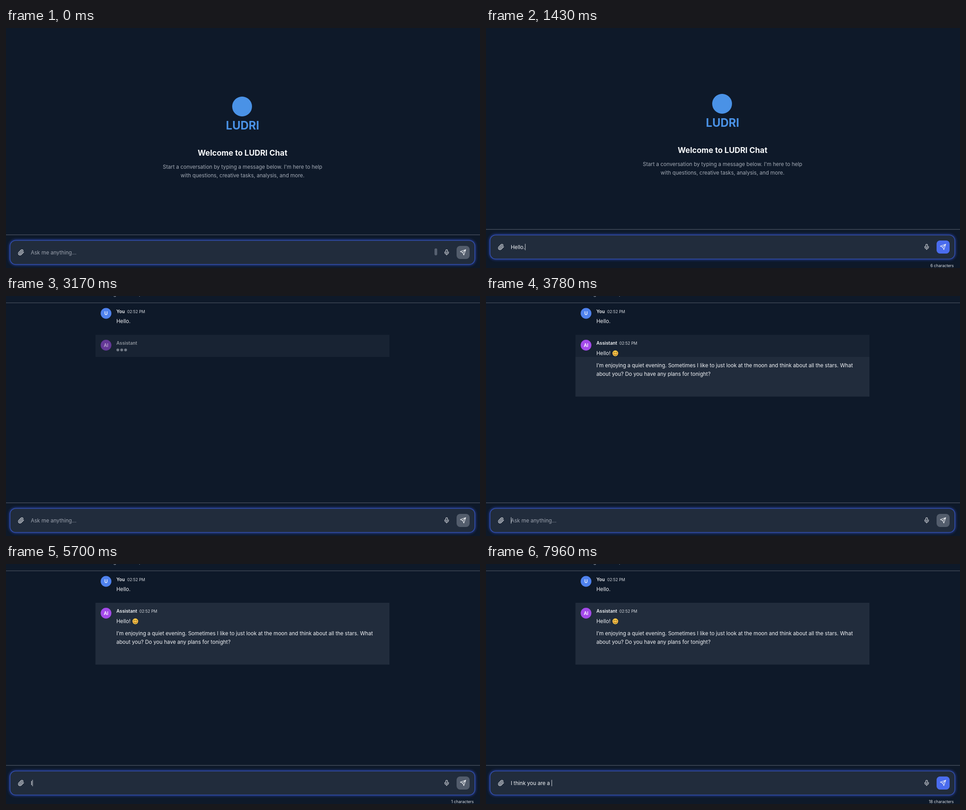
Write an HTML page with a canvas that moves like this. It is 1052 px wide and 532 px high and loops after 8 s.

```html
<!DOCTYPE html>
<html lang="en">
<head>
<meta charset="utf-8">
<title>Chat demo</title>
<style>
  html, body { margin: 0; width: 100%; height: 100%; overflow: hidden; background: #0e1929; }
  canvas { display: block; width: 1052px; height: 532px; }
</style>
</head>
<body>
<canvas id="stage" width="1052" height="532"></canvas>
<script>
const W = 1052, H = 532, LOOP = 8000;
const ctx = document.getElementById('stage').getContext('2d');

const BG = '#0e1929', PANEL = '#212c3c', LINE = '#4a5361', BLUE = '#4a92e6';
const BODY = 11.6, LABEL = 10.2, SMALL = 8.73;
const BRAND = 'LUDRI';
const SENT = 2650, REPLY = 3480, REPAINT = 5000;

// Each entry is the time at which one more character is typed.
const firstKeys = [740, 860, 960, 1060, 1150, 1430];
const secondKeys = [5650, 5850, 6130, 6350, 6520, 6610,
  ...Array.from({ length: 10 }, (_, i) => 7000 + i * 67), 7910, 7950];
const REPLY_LINES = [
  'Hello!',
  'I’m enjoying a quiet evening. Sometimes I like to just look at the moon and think about all the stars. What',
  'about you? Do you have any plans for tonight?'
];
const caretSpans = [[200, 2480], [SENT, 3150], [3680, 4200], [REPAINT, 5350], [5650, LOOP]];

const icons = {
  clip: new Path2D('M21.44 11.05l-9.19 9.19a6 6 0 0 1-8.49-8.49l8.57-8.57A4 4 0 1 1 18 8.84l-8.59 8.57a2 2 0 0 1-2.83-2.83l8.49-8.48'),
  mic: new Path2D('M12 2a3 3 0 0 0-3 3v7a3 3 0 0 0 6 0V5a3 3 0 0 0-3-3ZM19 10v2a7 7 0 0 1-14 0v-2M12 19v3'),
  send: new Path2D('M22 2l-7 20-4-9-9-4ZM22 2L11 13')
};

const clamp = v => Math.max(0, Math.min(1, v));
const ramp = (t, from, to) => clamp((t - from) / (to - from));

function text(str, x, y, size, color, weight = 400, align = 'left') {
  ctx.font = `${weight} ${size}px Inter, sans-serif`;
  ctx.textAlign = align;
  ctx.fillStyle = color;
  ctx.fillText(str, x, y);
}

function rect(x, y, w, h, color) {
  ctx.fillStyle = color;
  ctx.fillRect(x, y, w, h);
}

function roundRect(x, y, w, h, r, color) {
  ctx.beginPath();
  ctx.roundRect(x, y, w, h, r);
  ctx.fillStyle = color;
  ctx.fill();
}

function disc(x, y, r, color) {
  ctx.beginPath();
  ctx.arc(x, y, r, 0, Math.PI * 2);
  ctx.fillStyle = color;
  ctx.fill();
}

function faded(alpha, draw) {
  if (alpha <= 0) return;
  ctx.save();
  ctx.globalAlpha = alpha;
  draw();
  ctx.restore();
}

function icon(path, cx, cy, size, color) {
  ctx.save();
  ctx.translate(cx - size / 2, cy - size / 2);
  ctx.scale(size / 24, size / 24);
  ctx.lineWidth = 2;
  ctx.lineCap = ctx.lineJoin = 'round';
  ctx.strokeStyle = color;
  ctx.stroke(path);
  ctx.restore();
}

function smiley(x, y) {
  disc(x, y, 6.4, '#f6c544');
  disc(x - 4, y + 1.2, 1.5, '#f0a04a');
  disc(x + 4, y + 1.2, 1.5, '#f0a04a');
  ctx.strokeStyle = '#6b4317';
  ctx.lineWidth = 1;
  for (const [dx, dy, r, from, to] of [
    [-2.4, -1, 1.3, Math.PI, 0], [2.4, -1, 1.3, Math.PI, 0], [0, 0.8, 3.2, 0.25, Math.PI - 0.25]
  ]) {
    ctx.beginPath();
    ctx.arc(x + dx, y + dy, r, from, to);
    ctx.stroke();
  }
}

function welcome(dy) {
  const mid = 525;
  disc(524, 174 + dy, 22, BLUE);
  text(BRAND, mid, 225 + dy, 25, BLUE, 700, 'center');
  text(`Welcome to ${BRAND} Chat`, mid, 283.4 + dy, 17.3, '#f7f9fb', 700, 'center');
  text("Start a conversation by typing a message below. I'm here to help", mid, 311.7 + dy, BODY, '#a4abb6', 400, 'center');
  text('with questions, creative tasks, analysis, and more.', mid, 330.7 + dy, BODY, '#a4abb6', 400, 'center');
}

function messageHead(y, initials, color, name, time) {
  disc(222, y + 4.5, 11.9, color);
  text(initials, 222, y + 8, LABEL, '#fff', 600, 'center');
  text(name, 245, y + 3.7, LABEL, '#f3f5f8', 600);
  if (time) text('02:52 PM', time, y + 3.8, SMALL, '#d3d7dd');
}

function reply(t) {
  const total = REPLY_LINES.join('').length;
  let left = Math.ceil(total * ramp(t, REPLY, 3760));
  REPLY_LINES.forEach((line, i) => {
    text(line.slice(0, Math.max(0, left)), 245, [131, 157.8, 176.7][i], BODY, '#f3f5f8');
    left -= line.length;
    if (i === 0 && left > 0) smiley(287, 127);
  });
}

function conversation(t) {
  text('g', 238, -1.5, BODY, '#a4abb6');
  text('p', 295, -1.5, BODY, '#a4abb6');
  rect(0, 14.5, W, 1.2, LINE);

  faded(ramp(t, SENT, 2900), () => {
    messageHead(34, 'U', '#4f82ee', 'You', 269);
    text('Hello.', 245, 60.3, BODY, '#f3f5f8');
  });

  const answered = t >= REPLY;
  const shown = ramp(t, 2900, 3400);
  // The upper band of the card stays half lit until the repaint.
  const band = t < REPAINT ? Math.min(shown, 0.52) : 1;
  faded(band, () => rect(198.5, 86, 652.5, 49, PANEL));
  if (answered) rect(198.5, 135, 652.5, 88, PANEL);

  faded(shown, () => {
    messageHead(104.5, 'AI', '#a44aea', 'Assistant', answered && 296);
    if (answered) reply(t);
    else for (const x of [248.2, 256.8, 265.4]) disc(x, 119.5, 3.1, '#bcc2cb');
  });
}

function composer(t, typed, sinceKey) {
  const dy = typed ? -12 : 0;
  rect(0, 457.8 + dy, W, 1.3, LINE);

  ctx.save();
  ctx.shadowColor = 'rgba(58, 92, 235, 0.9)';
  ctx.shadowBlur = 6;
  roundRect(8.5, 470.5 + dy, 1032.5, 54, 13, '#3a5ac8');
  ctx.restore();
  roundRect(9.6, 471.6 + dy, 1030.3, 51.8, 12, PANEL);

  icon(icons.clip, 33.5, 497.3 + dy, 14.5, '#e2e5ea');
  icon(icons.mic, 978, 497.3 + dy, 14.5, '#e2e5ea');

  const baseline = 501.8 + dy;
  if (typed) text(typed, 55, baseline, BODY, '#f3f5f8');
  else text('Ask me anything...', 55, baseline, BODY, '#9ca3af');

  if (caretSpans.some(([from, to]) => t >= from && t < to)) {
    ctx.font = `400 ${BODY}px Inter, sans-serif`;
    rect(55.3 + ctx.measureText(typed).width, 490.5 + dy, 1, 14, '#dfe3e8');
  }

  roundRect(1000, 483 + dy, 29, 29, 8, '#535d6c');
  if (typed) faded(ramp(sinceKey, 50, 250), () => roundRect(1000, 483 + dy, 29, 29, 8, '#4a6cee'));
  icon(icons.send, 1014.3, 497.3 + dy, 14.5, '#f0f2f5');

  if (typed) text(`${typed.length} characters`, 1038, 530.2, SMALL, '#e0e3e8', 400, 'right');
  faded(1 - ramp(t, 40, 220), () => roundRect(951, 488.5, 6, 15.5, 3, '#566070'));
}

function draw(t) {
  const sent = t >= SENT;
  const keys = sent ? secondKeys : firstKeys;
  const phrase = sent ? 'I think you are a ' : 'Hello.';
  const typed = phrase.slice(0, keys.filter(k => k <= t).length);

  rect(0, 0, W, H, BG);
  if (sent) conversation(t);
  else welcome(typed ? -6 : 0);
  composer(t, typed, t - keys[0]);
}

const start = performance.now();
function frame() {
  draw((performance.now() - start) % LOOP);
  requestAnimationFrame(frame);
}
frame();
</script>
</body>
</html>
```
